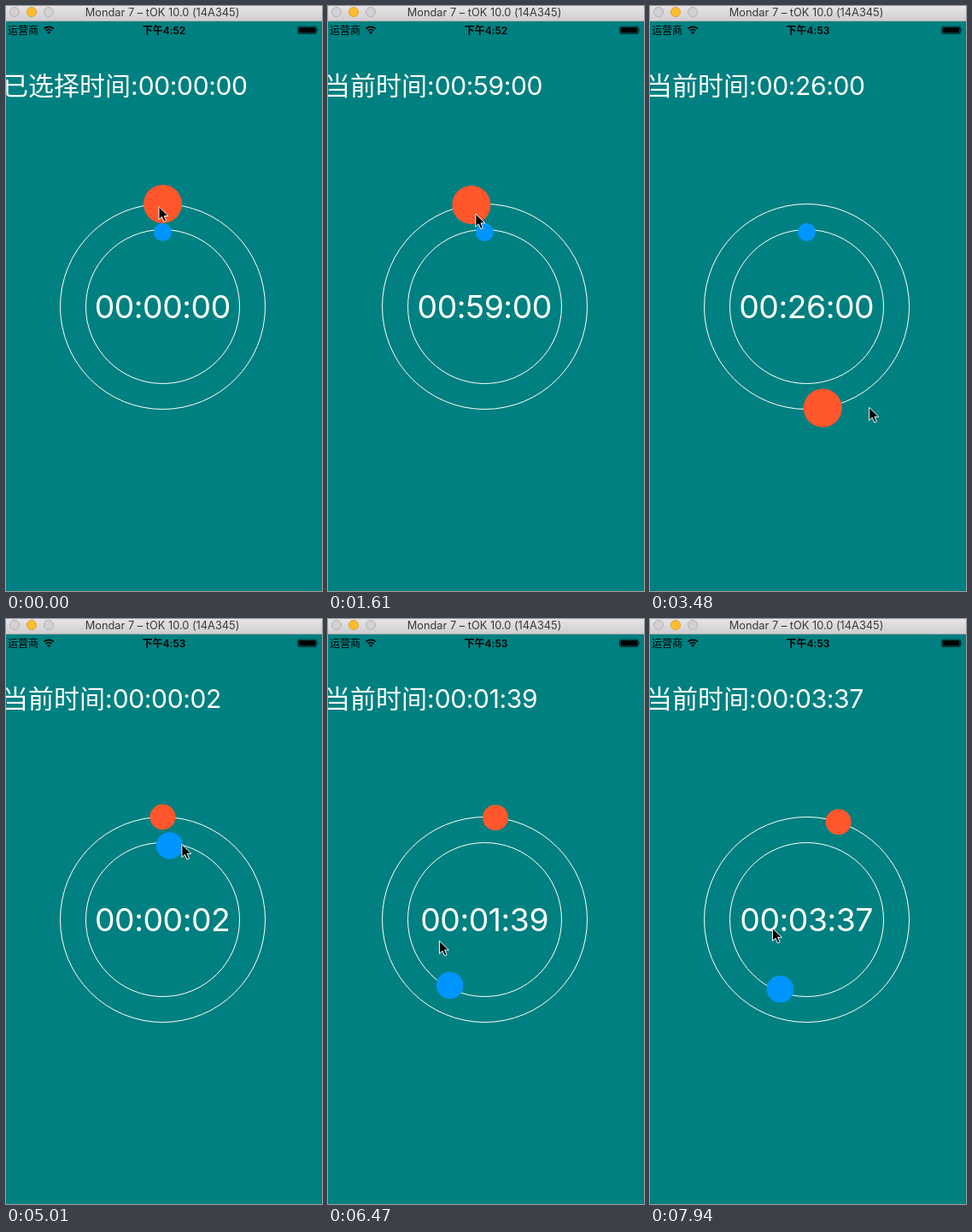
Write an HTML page that moves like this. It is 370 by 684 pixels and loops after 8 s.

```html
<!DOCTYPE html>
<html lang="zh-CN">
<head>
<meta charset="utf-8">
<style>
html, body { margin: 0; width: 100%; height: 100%; overflow: hidden; background: #008080; }
svg { display: block; width: 100%; height: 100%; }
text { font-family: Inter, "Noto Sans CJK SC", "Noto Sans CJK", sans-serif; font-feature-settings: "calt" 0; }
.mid { text-anchor: middle; }
.big { fill: #fff; }
.time { letter-spacing: -.012em; }
.ring { fill: none; stroke: #fff; }
</style>
</head>
<body>
<svg viewBox="0 0 370 684">
  <defs>
    <linearGradient id="bar" x2="0" y2="1">
      <stop stop-color="#e6e4e6"/><stop offset="1" stop-color="#d0ced0"/>
    </linearGradient>
  </defs>
  <rect width="370" height="684" fill="#008080"/>
  <rect width="370" height="17" fill="url(#bar)"/>
  <rect y="17" width="370" height="1" fill="#b3b1b3"/>
  <g fill="#d3d1d3" stroke="#b2b0b2">
    <circle cx="10" cy="7" r="5.5"/>
    <circle cx="30" cy="7" r="5.5" fill="#fdbd2e" stroke="#dea033"/>
    <circle cx="50" cy="7" r="5.5"/>
  </g>
  <text class="mid" x="183" y="11.8" font-size="12.8" fill="#3a393a">Mondar 7 – tOK 10.0 (14A345)</text>

  <text x="2" y="32.5" font-size="12">运营商</text>
  <g fill="none" stroke="#000" stroke-width="1.7">
    <path d="M44.4 26.6a8.4 8.4 0 0 1 11.4 0M46.7 29a5 5 0 0 1 6.8 0"/>
    <path d="M50.1 33l-2.1-2.2a3 3 0 0 1 4.2 0z" fill="#000" stroke="none"/>
  </g>
  <text class="mid" id="clock" x="185" y="32.5" font-size="12" font-weight="600"></text>
  <rect x="341.5" y="24" width="22" height="8.5" rx="1.5" fill="none" stroke="#000" stroke-width=".6"/>
  <rect x="342.5" y="25" width="20" height="6.5" rx=".6"/>
  <path d="M364.5 26.7q1.6 1.5 0 3z"/>

  <text class="big" x="-4" y="104" font-size="30"><tspan id="label"></tspan><tspan class="time" id="picked"></tspan></text>
  <circle class="ring" cx="183.5" cy="351.5" r="120"/>
  <circle class="ring" cx="183.5" cy="351.5" r="90"/>
  <text class="big mid time" id="dial" x="183.2" y="365.2" font-size="37.3"></text>
  <circle id="minute" fill="#ff572b"/>
  <circle id="second" fill="#0095ff"/>
  <path id="cursor" d="M0 0V15.2L3.5 11.9 6 17.6 8.6 16.5 6.2 10.9H11Z" fill="#000" stroke="#fff" stroke-linejoin="round"/>
</svg>
<script>
const LOOP = 8000, END = 7940, CX = 183.5, CY = 351.5;
const LAG = 60;    // handles trail the readout, ms
const DELAY = 15;  // half a screen refresh, ms
const $ = id => document.getElementById(id);

const ramp = (t, from, to) => Math.min(1, Math.max(0, (t - from) / (to - from)));
const smooth = p => p * p * (3 - 2 * p);

// Linear path through [ms, value, ...] points
function along(points, t, col) {
  let v = points[0][col];
  for (let i = 1; i < points.length; i++) {
    const a = points[i - 1], b = points[i];
    v += (b[col] - a[col]) * ramp(t, a[0], b[0]);
  }
  return v;
}

// Dragged angles, degrees clockwise from the top
const minuteAngle = t => 360 * (smooth(ramp(t, 0, 1680)) - smooth(ramp(t, 2290, 4450)));
const spin = [[4890, 0], [5010, 14], [5850, 315], [7080, 885], [7880, 1288], [7940, 1311]];
const secondAngle = t => along(spin, t, 1);

// Pointer: degrees ahead of the drag, distance from the centre
const hand = [[0, -2.2, 117], [1610, -3, 109], [2200, 0, 112], [3480, -8, 139], [3560, -16, 150],
  [4360, -28, 94], [4640, 0, 87], [5010, 2, 91], [5850, 9, 59], [7080, 9.5, 58], [7940, 31, 41]];

const held = (t, down, up) => (ramp(t, down, down + 100) - ramp(t, up, up + 150)) / 2;

function polar(deg, r) {
  const a = deg * Math.PI / 180;
  return [CX + r * Math.sin(a), CY - r * Math.cos(a)];
}

function place(id, deg, orbit, r) {
  const [cx, cy] = polar(deg, orbit);
  for (const [k, v] of Object.entries({ cx, cy, r })) $(id).setAttribute(k, v);
}

const pad = n => String(Math.floor(n)).padStart(2, '0');

function draw(t) {
  const secs = Math.floor(secondAngle(t) / 6);
  const total = Math.floor(minuteAngle(t) / 6) * 60 + secs;
  const time = [total / 3600, total / 60 % 60, total % 60].map(pad).join(':');
  const dragging = t >= 15 && t < 1940 || t >= 2290 && t < 4345 || t >= 4920;

  $('clock').textContent = t < 3000 ? '下午4:52' : '下午4:53';
  $('label').textContent = dragging ? '当前时间:' : '已选择时间:';
  $('picked').textContent = $('dial').textContent = time;

  place('minute', minuteAngle(t - LAG) + Math.floor(secs / 60) * 6, 120,
    15 * (1 + held(t, -100, 1940) + held(t, 2150, 4365)));
  place('second', secondAngle(t - LAG), 87, 10.5 * (1 + held(t, 4890, LOOP)));

  const aim = minuteAngle(t) + secondAngle(t) + along(hand, t, 1);
  $('cursor').setAttribute('transform', `translate(${polar(aim, along(hand, t, 2))})`);
}

function frame(now) {
  draw(Math.min(Math.max(now % LOOP - DELAY, 0), END));
  requestAnimationFrame(frame);
}
draw(0);
requestAnimationFrame(frame);
</script>
</body>
</html>
```
